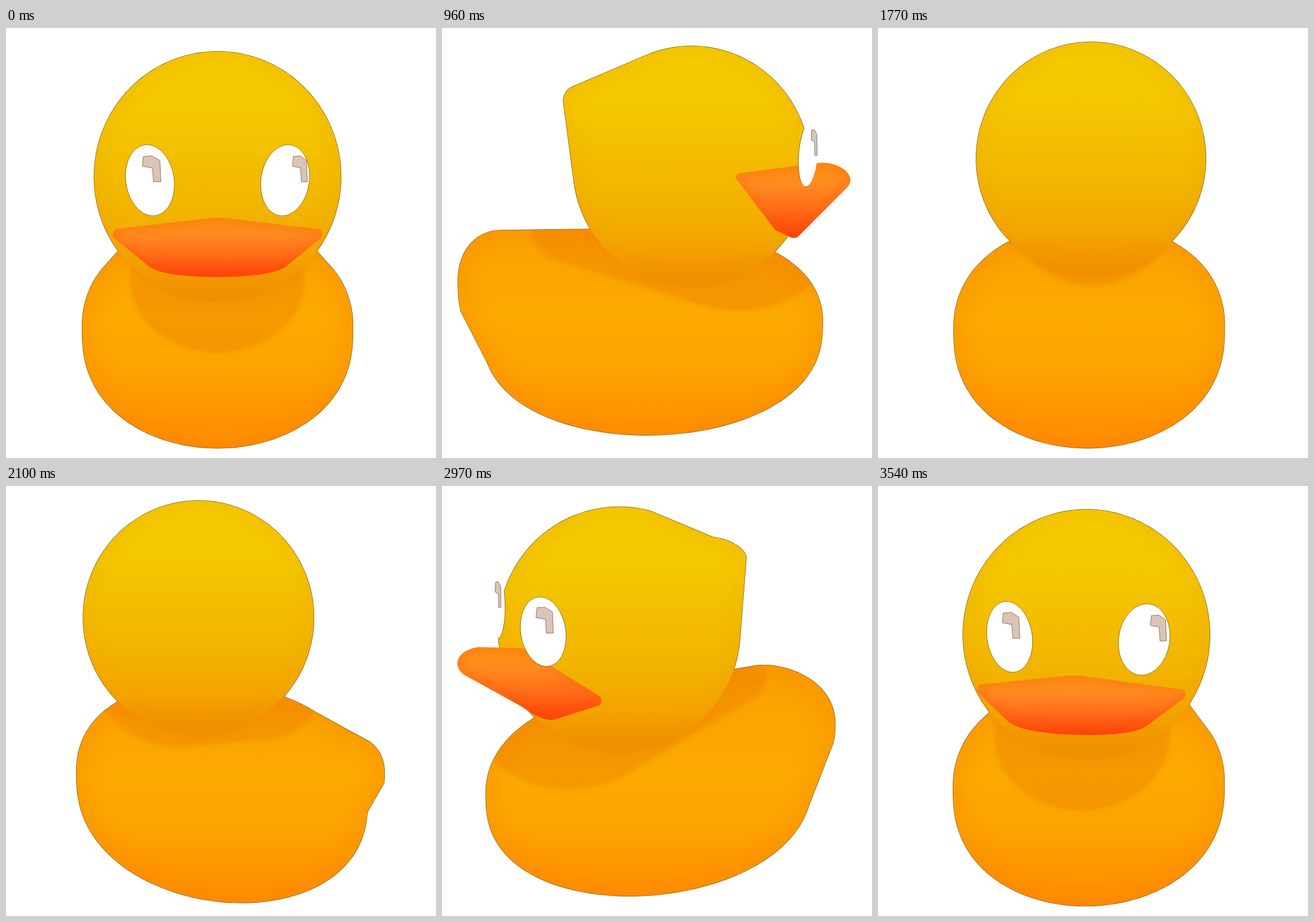
An HTML page with a canvas that plays this animation: 748x748 px, repeating every 3.57 s.

```html
<!DOCTYPE html>
<html>
<head>
<meta charset="utf-8">
<title>Turning rubber duck</title>
<style>
  html, body { margin: 0; width: 100%; height: 100%; overflow: hidden; background: #fff; }
  canvas { display: block; }
</style>
</head>
<body>
<canvas id="stage" width="748" height="748"></canvas>
<script>
const ctx = document.getElementById('stage').getContext('2d');
const LOOP = 3570, STEP = 30, TURN = 3585;
const TILT = Math.PI / 10, SIN = Math.sin(TILT), COS = Math.cos(TILT);
const CAMERA = 1750, CENTER_X = 368, CENTER_Y = 374;

// The duck is made of hulls of rounded blobs: centre and radii as [side, up, forward].
// A power below 2 makes a blob boxier from the side.
const blob = (at, size, power = 2, yaw = 0) => ({ at, size, power, yaw });
const head = [
  blob([0, 135, 65], [202, 205, 202]),
  blob([0, 250, -126], [80, 24, 24])
];
const body = [
  blob([0, -158, 0], [242, 160, 305], 1.7),
  blob([0, -68, -268], [142, 85, 75], 1.7)
];
const shade = [
  blob([0, -10, 150], [140, 110, 160]),
  blob([0, 30, -150], [90, 50, 60])
];
const beak = [
  blob([-156, 73, 180], [6, 8, 6]),
  blob([156, 73, 180], [6, 8, 6]),
  blob([0, 108, 300], [55, 24, 43]),
  blob([0, 48, 226], [110, 27, 22], 1.7)
];
const eyeOn = side => blob([99 * side, 174, 241], [42, 53, 12], 2, side * Math.PI / 6);
const eyes = [eyeOn(-1), eyeOn(1)];

const spin = ([s, u, f], angle) => {
  const c = Math.cos(angle), n = Math.sin(angle);
  return [s * c + f * n, u, f * c - s * n];
};

function project([x, u, z]) {
  const k = CAMERA / (CAMERA - z * COS - u * SIN);
  return [CENTER_X + x * k, CENTER_Y + (z * SIN - u * COS) * k];
}

// Farthest point of a turned blob along a world direction.
function support({ at, size: [a, b, c], power, yaw }, dir, angle) {
  const [s, u, f] = spin(dir, -angle - yaw);
  const flat = Math.hypot(a * s, c * f) + 1e-9, tall = Math.abs(b * u);
  const reach = (flat ** power + tall ** power) ** (1 / power);
  const out = (flat / reach) ** (power - 1) / flat;
  const rise = b * Math.sign(u) * (tall / reach) ** (power - 1);
  const offset = spin([a * a * s * out, rise, c * c * f * out], angle + yaw);
  const point = spin(at, angle).map((v, i) => v + offset[i]);
  return { point, far: point.reduce((sum, v, i) => sum + v * dir[i], 0) };
}

// Silhouette of the hull of some blobs, with its bounds.
function silhouette(blobs, angle, samples = 240) {
  const path = new Path2D(), xs = [], ys = [];
  for (let i = 0; i < samples; i++) {
    const a = i / samples * 2 * Math.PI, up = Math.sin(a);
    const dir = [Math.cos(a), up * COS, -up * SIN];
    const best = blobs.map(b => support(b, dir, angle)).reduce((p, q) => q.far > p.far ? q : p);
    const [x, y] = project(best.point);
    path.lineTo(x, y);
    xs.push(x);
    ys.push(y);
  }
  path.closePath();
  return { path, left: Math.min(...xs), right: Math.max(...xs), top: Math.min(...ys), bottom: Math.max(...ys) };
}

function vertical({ top, bottom }, ...stops) {
  const g = ctx.createLinearGradient(0, top, 0, bottom);
  stops.forEach(([at, color]) => g.addColorStop(at, color));
  return g;
}

function fill(path, style) {
  ctx.fillStyle = style;
  ctx.fill(path);
}

function outline(path, width, style) {
  ctx.lineWidth = width;
  ctx.strokeStyle = style;
  ctx.stroke(path);
}

function inside(path, draw) {
  ctx.save();
  ctx.clip(path);
  draw();
  ctx.restore();
}

function softly(radius, draw) {
  ctx.filter = `blur(${radius}px)`;
  draw();
  ctx.filter = 'none';
}

function drawBody(shape, headPath, angle) {
  fill(shape.path, vertical({ top: 320, bottom: 730 },
    [0, '#f9a000'], [.45, '#fcaa00'], [.65, '#fca400'], [1, '#ff8c00']));
  inside(shape.path, () => {
    softly(16, () => outline(shape.path, 36, 'rgba(250,125,0,.3)'));
    softly(3, () => fill(silhouette(shade, angle).path, 'rgba(238,125,0,.4)'));
    softly(7, () => fill(headPath, 'rgba(238,120,0,.35)'));
  });
}

function drawHead(shape) {
  fill(shape.path, vertical(shape,
    [0, '#f5cb00'], [.3, '#f4c500'], [.65, '#f2b300'], [.82, '#f4a500'], [.92, '#f39500'], [1, '#f28e00']));
  inside(shape.path, () => softly(12, () => outline(shape.path, 22, 'rgba(235,150,0,.2)')));
}

function drawBeak(angle) {
  const shape = silhouette(beak, angle);
  fill(shape.path, vertical(shape, [0, '#fb9212'], [.3, '#ff8a20'], [.6, '#ff6f18'], [1, '#ff400a']));
  inside(shape.path, () => softly(8, () => outline(shape.path, 12, 'rgba(255,80,0,.3)')));
}

function drawEye(eye, headPath, angle) {
  if (Math.cos(angle + eye.yaw) < -.15) return;
  const { path, left, right } = silhouette([eye], angle);
  fill(path, '#fff');
  inside(headPath, () => outline(path, 1, '#8a6c10'));

  // The reflection slides to the right as the eye turns that way.
  const [x, y] = project(spin(eye.at, angle));
  const turn = Math.max(-1, Math.min(1, (x - CENTER_X) / 120));
  const wide = (right - left) / 92, glint = new Path2D();
  for (const [gx, gy] of [[-15, -42], [1, -43], [16, -35], [18, 2], [4, 2], [2, -22], [-17, -25]])
    glint.lineTo(x + wide * (15 + 12 * turn + gx * (.9 - .1 * turn)), y + gy);
  glint.closePath();
  fill(glint, '#d9c4b5');
  outline(glint, 1, '#8d7665');
}

function draw(t) {
  const angle = t / TURN * 2 * Math.PI;
  const headShape = silhouette(head, angle), bodyShape = silhouette(body, angle);
  const beakBehind = Math.cos(angle) < -.25;

  ctx.fillStyle = '#fff';
  ctx.fillRect(0, 0, 748, 748);
  for (const { path } of [bodyShape, headShape]) outline(path, 1.4, '#6b5208');

  drawBody(bodyShape, headShape.path, angle);
  if (beakBehind) drawBeak(angle);
  drawHead(headShape);
  if (!beakBehind) drawBeak(angle);
  for (const eye of eyes) drawEye(eye, headShape.path, angle);
}

const start = performance.now();
function tick() {
  const t = (performance.now() - start) % LOOP;
  draw(Math.floor(t / STEP) * STEP);
  requestAnimationFrame(tick);
}
tick();
</script>
</body>
</html>
```
